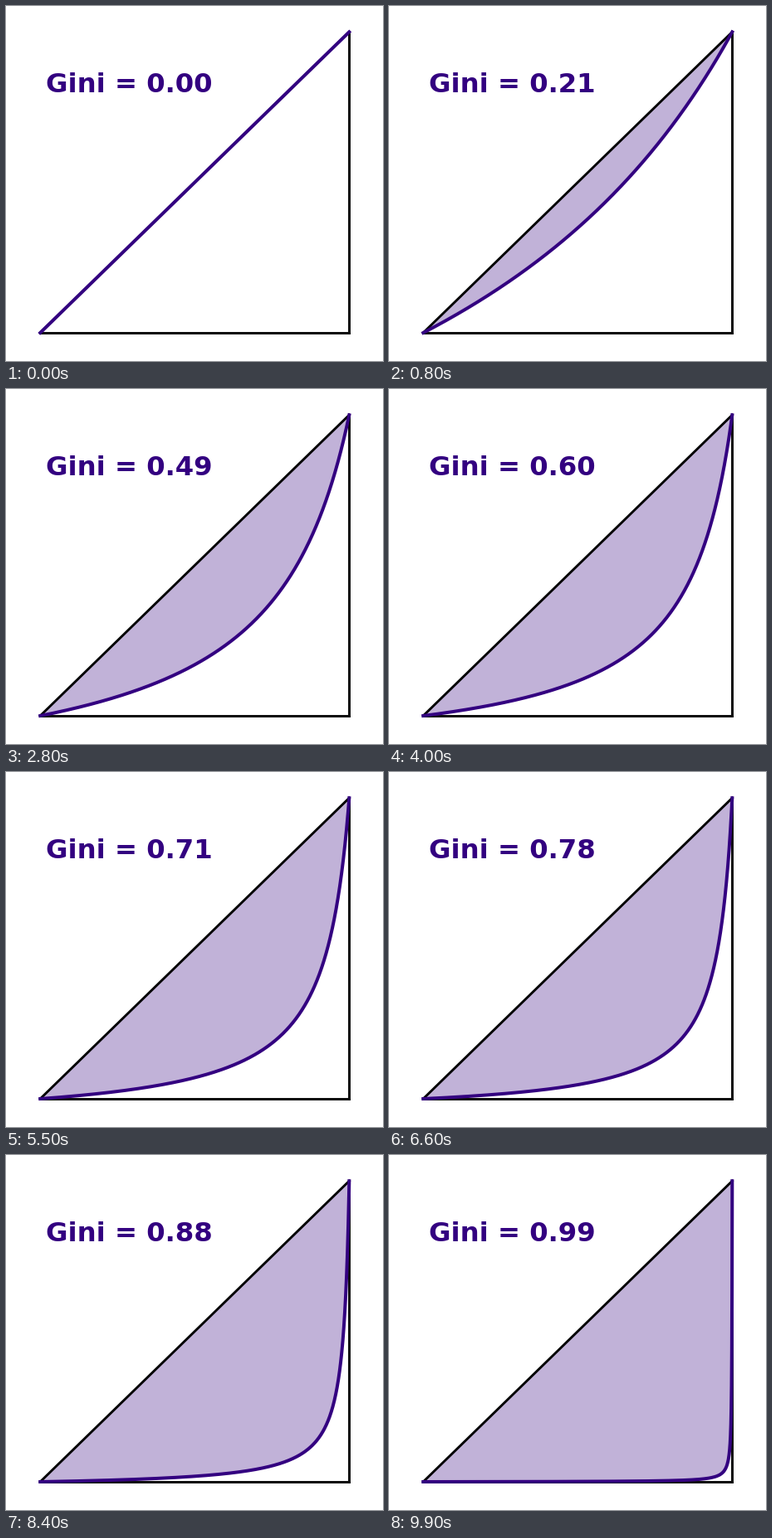
Animation of 454x428 px, one loop 10000 ms. Source, as a matplotlib script:

```python
import numpy as np
import matplotlib.pyplot as plt
from matplotlib.animation import FuncAnimation

W, H, DPI = 454, 428, 64
PT = 72 / DPI  # points per pixel
X0, X1, Y0, Y1 = 41.2, 413.3, 394.0, 31.3
PURPLE = "#330080"
FRAMES = 100

GRID = np.linspace(0, 1, 301)


def lorenz(x, s):
    """Hyperbolic Lorenz curve: equality at s = 0, full inequality at s = 1."""
    return (1 - s) * x / (1 - s + 10 * s * (1 - x))


def gini(s):
    if s == 0:
        return 0.0
    k = 0.1 * (1 - s) / s
    b = 1 + k
    return 2 * b * k * np.log(k / b) + 2 * b - 1


def to_stage(x, y):
    return X0 + (X1 - X0) * x, Y0 + (Y1 - Y0) * y


fig = plt.figure(figsize=(W / DPI, H / DPI), dpi=DPI, facecolor="white")
ax = fig.add_axes([0, 0, 1, 1])
ax.set_xlim(0, W)
ax.set_ylim(H, 0)
ax.axis("off")

area, = ax.fill([X0, X1, X1], [Y0, Y1, Y1], color=PURPLE, alpha=0.3, lw=0, zorder=1)
for xs, ys in (([X0, X1], [Y0, Y1]), ([X0, X1], [Y0, Y0]), ([X1, X1], [Y0, Y1])):
    ax.plot(xs, ys, color="black", lw=2.9 * PT, zorder=2)
curve, = ax.plot([], [], color=PURPLE, lw=4 * PT, zorder=3)
label = ax.text(48.2, 104.2, "", color=PURPLE, family="DejaVu Sans",
                weight="bold", size=32.2 * PT, va="baseline", zorder=4)


def update(i):
    s = i / FRAMES
    # mirrored samples keep the steep end smooth
    x = np.sort(np.concatenate([GRID, 1 - lorenz(GRID, s)]))
    px, py = to_stage(x, lorenz(x, s))
    curve.set_data(px, py)
    area.set_xy(np.column_stack([px, py]))
    label.set_text(f"Gini = {gini(s):.2f}")
    return area, curve, label


anim = FuncAnimation(fig, update, frames=FRAMES, interval=100, repeat=True, repeat_delay=0)
plt.show()
```
